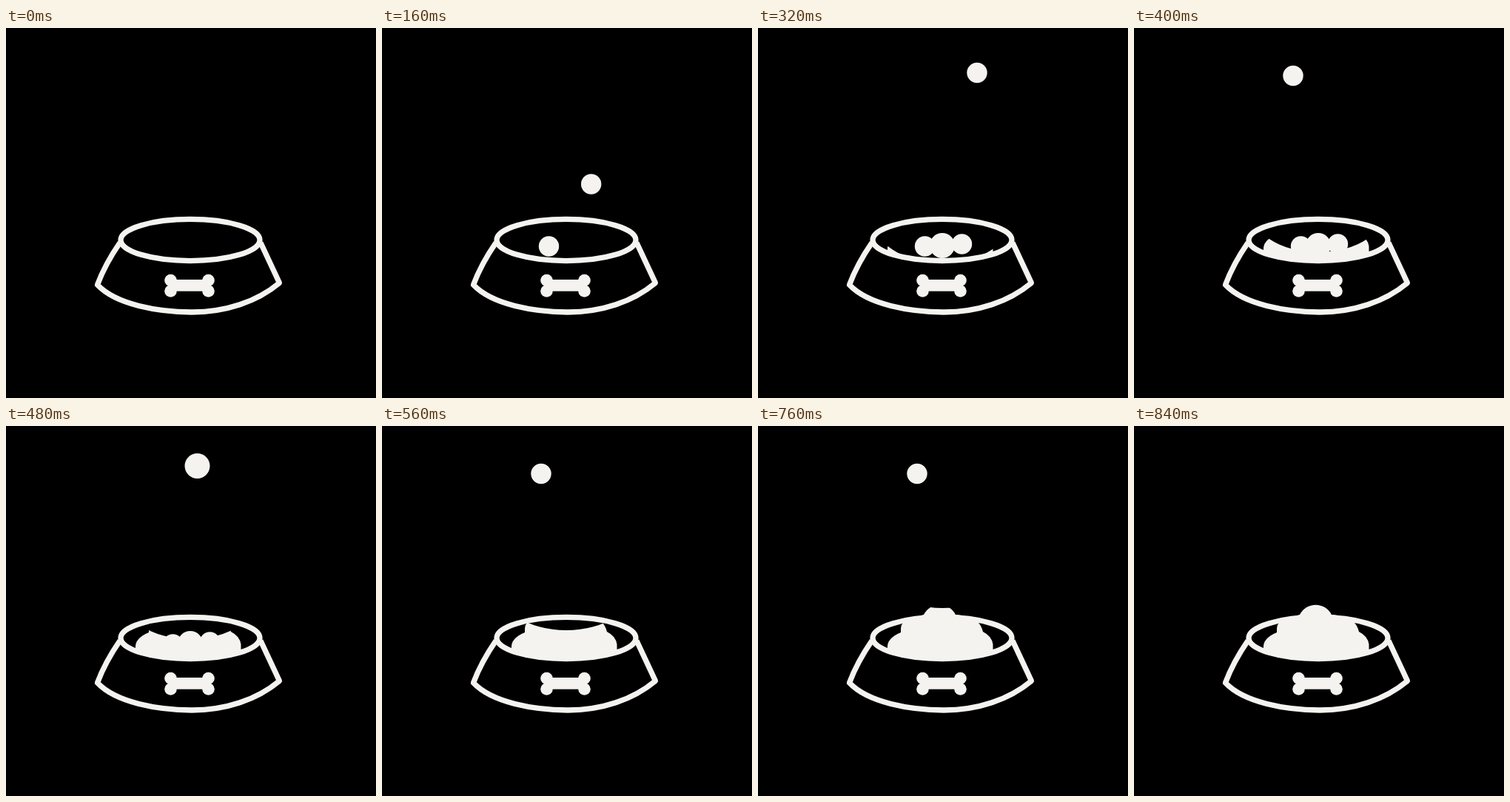
Recreate the animation shown at these times as an HTML page with a canvas. Size 500 px wide and 500 px high, loop 4.8 s.

```html
<!DOCTYPE html>
<html lang="en">
<head>
<meta charset="utf-8">
<title>Filling bowl</title>
<style>
html, body { margin: 0; height: 100%; overflow: hidden; background: #000; }
canvas { display: block; }
</style>
</head>
<body>
<canvas id="stage" width="500" height="500"></canvas>
<script>
const ctx = document.getElementById('stage').getContext('2d');
const LOOP = 4800, STEP = 40, LAST = 21;

const balls = {
  left: { from: [215, 64.5], to: [225.5, 295], r: 13.7 },
  mid: { from: [258.5, 54], to: [249, 294], r: 17 },
  right: { from: [296, 60.5], to: [275.5, 292], r: 13.7 }
};
// Each drop shows at the top, then on its way down, then lands.
const drops = [
  ['left', 1], ['right', 3], ['mid', 5], ['right', 8], ['left', 10],
  ['mid', 12], ['left', 14], ['mid', 16], ['right', 17], ['left', 19]
];
const fall = [0, 0.65, 1];

const bowl = new Path2D(
  'M154 290 Q134 319 123.5 347 C149 374 205 383.5 251 384 ' +
  'C297 384 339 370 369.5 344.5 L344 290');
const pile = new Path2D(
  'M175 304 V297 Q176 286 193 279 Q192 266 200 263 Q210 258 224 255 ' +
  'A24 24 0 0 1 267 255 Q289 257 297 265 Q302 270 304 278 ' +
  'Q316 284 317.5 295 V304 Q249 324 175 304Z');

function disc(x, y, r) {
  ctx.beginPath();
  ctx.arc(x, y, r, 0, Math.PI * 2);
  ctx.fill();
}

function drawBowl() {
  ctx.lineWidth = 7.3;
  ctx.lineJoin = 'round';
  ctx.stroke(bowl);
  ctx.beginPath();
  ctx.ellipse(249, 286.5, 94, 28.1, 0, 0, Math.PI * 2);
  ctx.stroke();
  ctx.fillRect(222, 340, 52, 15.7);
  for (const x of [222.5, 273.5])
    for (const y of [341, 355.5]) disc(x, y, 8.3);
}

// The pile is uncovered from below by a rising concave edge.
function drawPile(step) {
  const level = 288 - (step - 12) * (step < 12 ? 7.5 : 6);
  ctx.save();
  ctx.beginPath();
  ctx.ellipse(249, level - 63, 95, 63, 0, Math.PI, 0, true);
  ctx.lineTo(344, 500);
  ctx.lineTo(154, 500);
  ctx.clip();
  ctx.fill(pile);
  ctx.restore();
}

function drawBalls(step) {
  drops.forEach(([name, start], n) => {
    const age = step - start;
    if (age < 0 || (n > 2 && age > 1)) return;
    const { from, to, r } = balls[name], p = fall[Math.min(age, 2)];
    disc(from[0] + (to[0] - from[0]) * p, from[1] + (to[1] - from[1]) * p, r);
  });
}

function frame() {
  const step = Math.min(LAST, Math.floor(performance.now() % LOOP / STEP));
  ctx.fillStyle = '#000';
  ctx.fillRect(0, 0, 500, 500);
  ctx.fillStyle = ctx.strokeStyle = '#f4f3f0';
  drawPile(step);
  drawBalls(step);
  drawBowl();
  requestAnimationFrame(frame);
}
frame();
</script>
</body>
</html>
```
